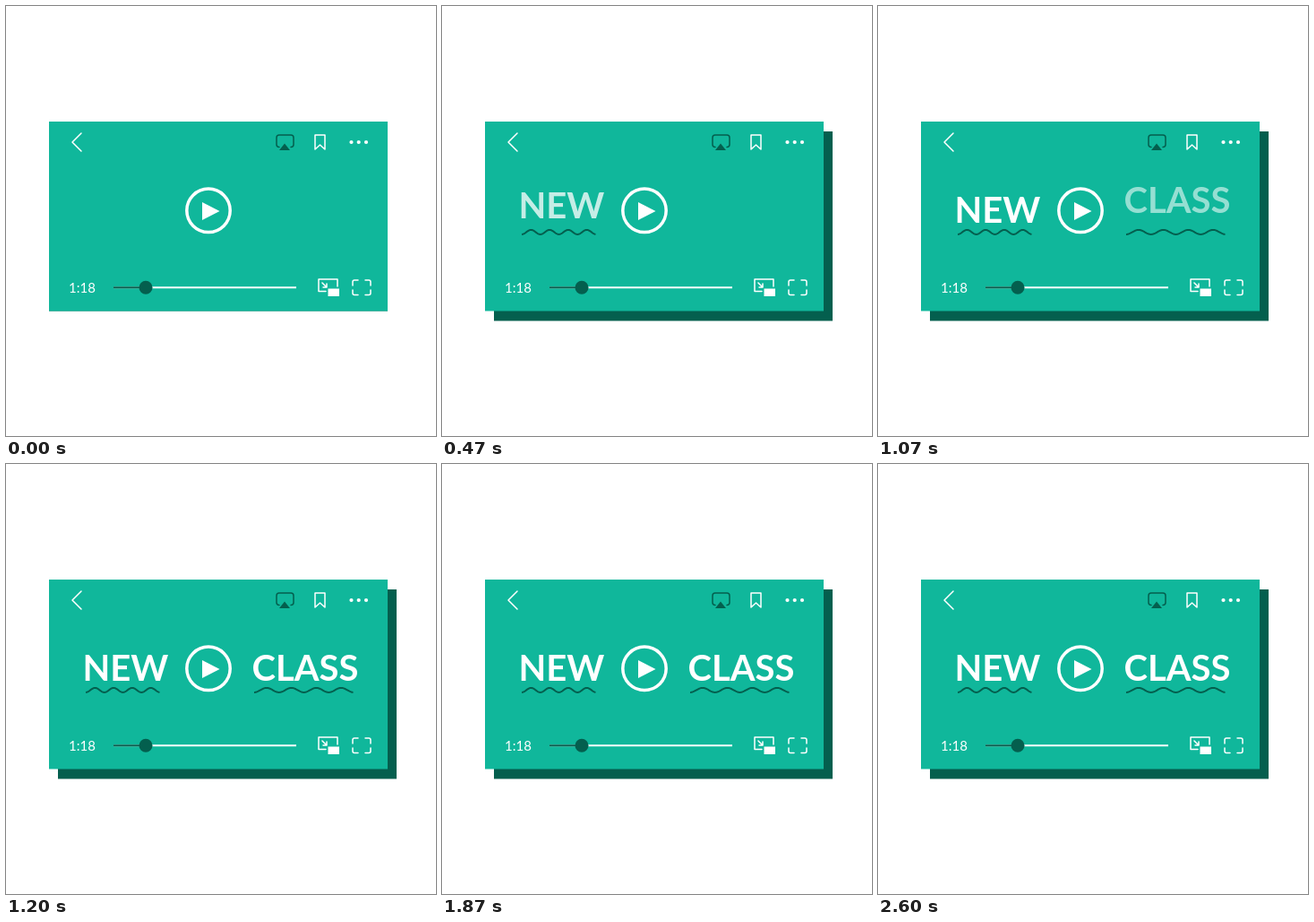
Recreate the animation shown at these times as an HTML page. Size 480 px wide and 480 px high, loop 3.47 s.

```html
<!DOCTYPE html>
<html lang="en">
<head>
<meta charset="utf-8">
<style>
html, body { margin: 0; width: 100%; height: 100%; overflow: hidden; background: #fff }
svg { display: block; width: 100vw; height: 100vh }
text { font-family: Lato, sans-serif; fill: #fff }
.big { font-size: 40px; font-weight: 700 }
.line { fill: none; stroke: #fff; stroke-width: 1.5; stroke-linecap: round; stroke-linejoin: round }
.dark { stroke: #045f4e }
.wave { stroke-width: 2; stroke-linecap: butt }
</style>
</head>
<body>
<svg viewBox="0 0 480 480">
  <rect id="shadow" x="48" y="129" width="378" height="211.5" fill="#045f4e"/>
  <rect x="48" y="129" width="378" height="211.5" fill="#10b79b"/>

  <path class="line" d="M84 142L74 152L84 162"/>
  <path class="line dark" d="M305 157.500Q302 157.500 302 154.500V147Q302 144 305 144H318Q321 144 321 147V154.500Q321 157.500 318 157.500"/>
  <path d="M311 153.500L317 161H305Z" fill="#045f4e"/>
  <path class="line" d="M345 144H356V160L350.500 155L345 160Z"/>
  <g fill="#fff">
    <circle cx="385.500" cy="152" r="2.100"/>
    <circle cx="393.700" cy="152" r="2.100"/>
    <circle cx="402" cy="152" r="2.100"/>
    <path d="M219 219L238.500 229L219 239Z"/>
    <rect x="359.500" y="315.500" width="12.500" height="8.500"/>
  </g>
  <circle cx="226" cy="228.300" r="24.200" class="line" style="stroke-width:3.500"/>

  <text x="70" y="320" font-size="15">1:18</text>
  <path d="M120 314.200H324" stroke="#fff" stroke-width="2"/>
  <path d="M120 314.200H156" stroke="#045f4e" stroke-width="2"/>
  <circle cx="156" cy="314.200" r="7.500" fill="#045f4e"/>
  <path class="line" d="M357 318.500H349V305H370V313M353 309L358 314M358 310V314H354"/>
  <path class="line" d="M387 312V308Q387 306 389 306H393M401 306H405Q407 306 407 308V312M407 317V320.500Q407 322.500 405 322.500H401M393 322.500H389Q387 322.500 387 320.500V317"/>

  <path id="wave0" class="line dark wave"/>
  <path id="wave1" class="line dark wave"/>
  <text id="word0" class="big" x="85.500" y="242">NEW</text>
  <text id="word1" class="big" x="274.500" y="242">CLASS</text>
</svg>
<script>
const LOOP = 3470, FPS = 15;
const $ = id => document.getElementById(id);
const ramp = (t, a, b) => Math.min(1, Math.max(0, (t - a) / (b - a)));
const smooth = p => p * p * (3 - 2 * p);

function wave(x0, x1, part) {
  const end = x0 + (x1 - x0) * part, points = [];
  for (let x = x0; x < end; x += 0.5) {
    const y = 252.4 + 2.5 * Math.cos((x - x0) / (x1 - x0) * 8 * Math.PI);
    points.push(x.toFixed(1) + ' ' + y.toFixed(2));
  }
  return points.length ? 'M' + points.join('L') : '';
}

// Each word: its underline is drawn, then it fades in and drops into place
function showWord(i, t, x0, x1) {
  $('wave' + i).setAttribute('d', wave(x0, x1, smooth(ramp(t, 70, 330))));
  const word = $('word' + i);
  word.setAttribute('opacity', ramp(t, 240, 540));
  word.setAttribute('transform', `translate(0 ${-11 * (1 - smooth(ramp(t, 390, 540)))})`);
}

function draw(t) {
  const s = smooth(ramp(t, 0, 200));
  $('shadow').setAttribute('transform', `translate(${10 * s} ${11 * s})`);
  showWord(0, t, 89, 172);
  showWord(1, t - 660, 277, 388);
}

const start = performance.now();
function tick() {
  const t = (performance.now() - start) % LOOP;
  draw(Math.floor((t + 4) * FPS / 1000) * 1000 / FPS);
  requestAnimationFrame(tick);
}
tick();
</script>
</body>
</html>
```
